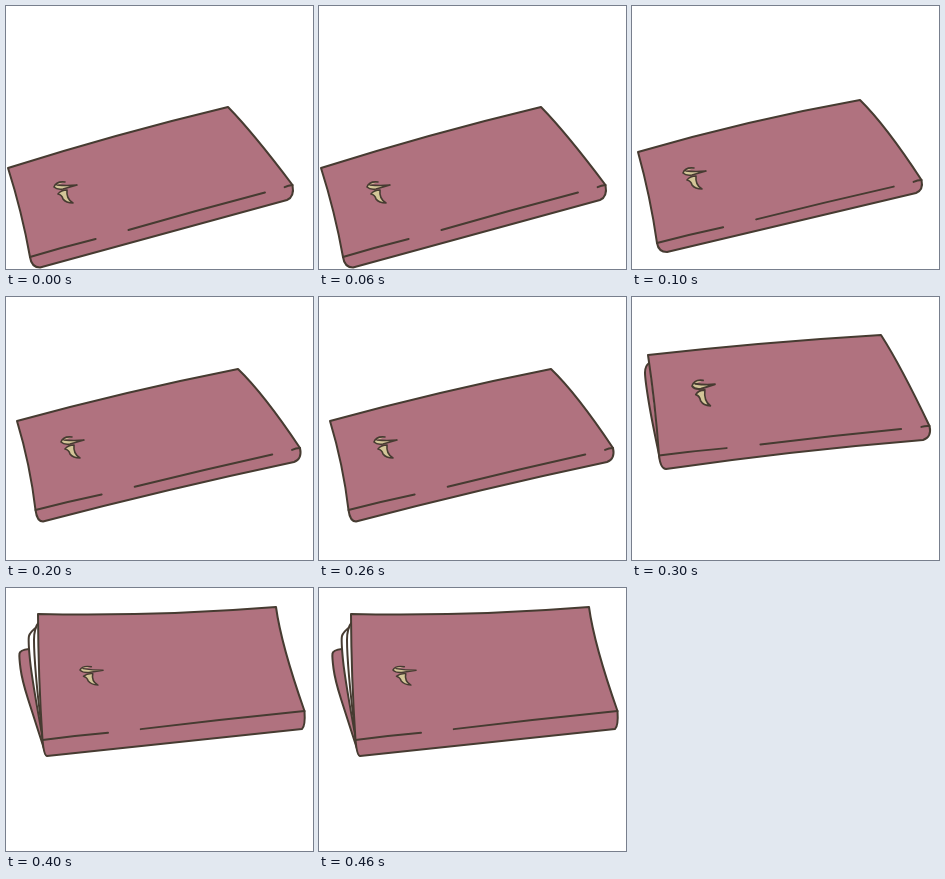
These frames come from a looping animation (307x263 px, 500 ms). An HTML page with a canvas:

```html
<!DOCTYPE html>
<html lang="en">
<head>
<meta charset="utf-8">
<title>Book lifting</title>
<style>
  html, body { margin: 0; width: 100%; height: 100%; overflow: hidden; background: #fff; }
  canvas { display: block; }
</style>
</head>
<body>
<canvas id="stage" width="307" height="263"></canvas>
<script>
const ctx = document.getElementById('stage').getContext('2d');
const STEP = 100;
const COVER = '#b0727f', INK = '#463b31', CREAM = '#d3c698';

// Corners run clockwise from top left; the seam runs from seamLeft to seamRight.
// Bends bulge the top, right, bottom and left edges outwards.
// A mark is x, y, angle and vertical scale.
const poses = [
  { topLeft: [2, 162], topRight: [222, 101], seamRight: [286.5, 179], lowRight: [281, 194],
    lowLeft: [34, 261.5], seamLeft: [24, 251], bends: [2, 1.5, 0, -1.5], mark: [47, 181, 0, 1] },
  { topLeft: [6, 146], topRight: [228, 94], seamRight: [289.5, 174], lowRight: [284, 187],
    lowLeft: [35, 246], seamLeft: [25, 237], bends: [3, 2.5, 0, -1.5], mark: [50, 167, 0, 1] },
  { topLeft: [11, 124], topRight: [232, 72], seamRight: [294, 151], lowRight: [288, 165],
    lowLeft: [37, 224.5], seamLeft: [29.5, 213], bends: [2, 2.5, -1.5, -2], mark: [54, 145, 0, 1] },
  { topLeft: [16, 58], topRight: [249, 38], seamRight: [297.5, 129], lowRight: [291, 143],
    lowLeft: [34, 172], seamLeft: [27, 158.5], bends: [1.5, 1.5, -2, -1], mark: [59, 89, .03, 1.2],
    back: [[17, 66], [13, 69], [13, 82], [20, 125], [28, 162]] },
  { topLeft: [32, 26], topRight: [270, 19], seamRight: [298.5, 123], lowRight: [296, 141],
    lowLeft: [41, 168], seamLeft: [36.5, 152], bends: [-3, -2.5, 0, 1], mark: [73, 82, .08, .85],
    back: [[23, 61], [14, 62], [13, 69], [16, 92], [28, 130], [40, 167]],
    pages: [
      [[32, 38], [24, 44], [22, 52], [26, 92], [37, 152]],
      [[33, 34], [28, 40], [28, 64], [32, 112], [37, 150]]
    ] }
];

const swoosh = new Path2D('M12 -5 Q3 -6 1 0 Q4 3 10 2 Q17 0 24 -2 Q14 -1 4 -2');
const crescent = new Path2D('M14 3 Q8 3 5 7 Q9 8 10 12 Q13 16 20 16 Q13 12 14 3Z');

// skew tells how far along the edge the bulge sits.
function bendTo(a, b, bend = 0, skew = .5) {
  const dx = b[0] - a[0], dy = b[1] - a[1], k = 2 * bend / Math.hypot(dx, dy);
  ctx.quadraticCurveTo(a[0] + dx * skew + dy * k, a[1] + dy * skew - dx * k, ...b);
}

function paint(fill) {
  if (fill) {
    ctx.fillStyle = fill;
    ctx.fill();
  }
  ctx.stroke();
}

function smooth(points, fill) {
  ctx.beginPath();
  ctx.moveTo(...points[0]);
  for (let i = 1; i < points.length - 1; i++) {
    const [x, y] = points[i], next = points[i + 1];
    const last = i === points.length - 2;
    ctx.quadraticCurveTo(x, y, last ? next[0] : (x + next[0]) / 2, last ? next[1] : (y + next[1]) / 2);
  }
  paint(fill);
}

function drawSeam(a, b, from, to) {
  const at = t => [a[0] + (b[0] - a[0]) * t, a[1] + (b[1] - a[1]) * t];
  ctx.beginPath();
  ctx.moveTo(...at(from));
  bendTo(at(from), at(to), .4);
  ctx.stroke();
}

function drawCover({ topLeft, topRight, seamRight, lowRight, lowLeft, seamLeft, bends }) {
  const [top, right, bottom, left] = bends;
  ctx.beginPath();
  ctx.moveTo(...topLeft);
  bendTo(topLeft, topRight, top);
  bendTo(topRight, seamRight, right, .35);
  ctx.quadraticCurveTo(seamRight[0] + .4 * (seamRight[0] - lowRight[0]), lowRight[1] - 3, ...lowRight);
  bendTo(lowRight, lowLeft, bottom);
  ctx.quadraticCurveTo(seamLeft[0] + 1.5, lowLeft[1], ...seamLeft);
  bendTo(seamLeft, topLeft, left);
  ctx.closePath();
  paint(COVER);
}

function drawMark([x, y, angle, squash]) {
  ctx.save();
  ctx.translate(x, y);
  ctx.rotate(angle);
  ctx.scale(1, squash);
  ctx.lineWidth = 1.6;
  ctx.fillStyle = CREAM;
  for (const shape of [crescent, swoosh]) {
    ctx.fill(shape);
    ctx.stroke(shape);
  }
  ctx.restore();
}

function draw(pose) {
  ctx.fillStyle = '#fff';
  ctx.fillRect(0, 0, 307, 263);
  ctx.strokeStyle = INK;
  ctx.lineWidth = 2;
  ctx.lineCap = ctx.lineJoin = 'round';
  if (pose.back) smooth(pose.back, COVER);
  for (const page of pose.pages || []) smooth(page, '#fff');
  drawCover(pose);
  const { seamLeft, seamRight } = pose;
  drawSeam(seamLeft, seamRight, 0, .25);
  drawSeam(seamLeft, seamRight, .375, pose.pages ? 1 : .895);
  if (!pose.pages) drawSeam(seamLeft, seamRight, .97, 1);
  drawMark(pose.mark);
}

const start = performance.now();
function tick() {
  const elapsed = performance.now() - start;
  draw(poses[Math.floor(elapsed / STEP) % poses.length]);
  requestAnimationFrame(tick);
}
tick();
</script>
</body>
</html>
```
